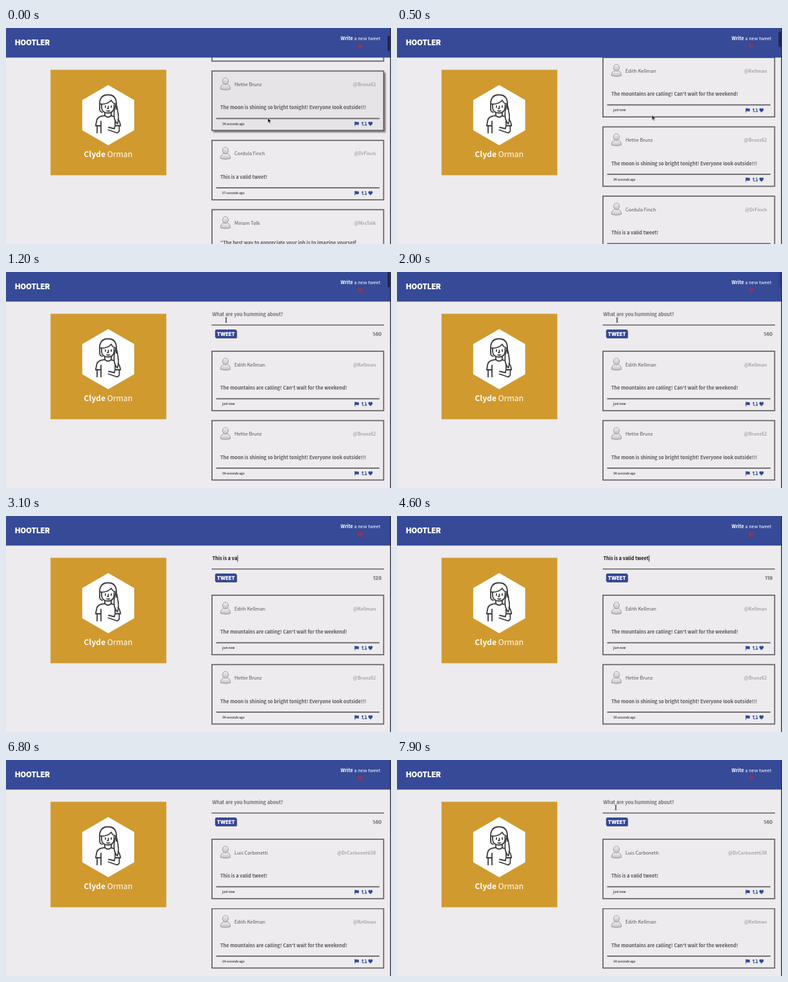
Recreate the animation shown at these times as an HTML page. Size 600 px wide and 338 px high, loop 8 s.

```html
<!DOCTYPE html>
<html lang="en">
<head>
<meta charset="utf-8">
<title>Short message feed</title>
<style>
  html, body { margin: 0; width: 100%; height: 100%; overflow: hidden; background: #edebed; }
  svg { display: block; width: 600px; height: 338px; font: 700 7.35px "Noto Sans CJK JP", "Noto Sans CJK SC", "Noto Sans CJK", "Open Sans", sans-serif; }
  .block { font-family: Inter, "Open Sans", sans-serif; font-weight: 900; }
  .line { fill: none; stroke: #625e65; stroke-width: 1.7; }
  .name { font-weight: 300; fill: #59555a; }
  .handle { font-size: 7px; fill: #aaa7aa; text-anchor: end; }
  .body { fill: #5b575c; }
  .time { font-size: 4.7px; fill: #454147; }
  .icons { fill: #3047a0; }

  .scroll { animation: scroll 8s infinite; }
  .mouse { animation: move 8s linear infinite, hide 8s step-end infinite; }
  .arrow { animation: arrow 8s step-end infinite; }
  .beam { animation: beam 8s step-end infinite; }
  .thumb { animation: thumb 8s linear infinite; }
  .chevron { transform-origin: 552px 28px; animation: tada 2s linear infinite; }
  .shade { opacity: 0; }
  .shade.first { animation: over-first 8s step-end infinite; }
  .shade.second { animation: over-second 8s step-end infinite; }

  @keyframes scroll {
    0% { transform: translateY(-165.2px); animation-timing-function: cubic-bezier(.333, 0, .667, 1); }
    12.06%, 100% { transform: none; }
  }
  @keyframes move {
    0% { transform: translate(408px, 141px); }
    10% { transform: translate(391px, 134px); }
    15%, 80% { transform: translate(343px, 75px); }
    92%, 100% { transform: translate(341px, 74px); }
  }
  @keyframes hide { 0% { opacity: 1; } 25.6% { opacity: 0; } 88.1%, 100% { opacity: 1; } }
  @keyframes arrow { 0% { opacity: 1; } 14.3%, 100% { opacity: 0; } }
  @keyframes beam { 0% { opacity: 0; } 14.3%, 100% { opacity: 1; } }
  @keyframes thumb {
    0% { transform: translateY(12px); opacity: 1; animation-timing-function: cubic-bezier(.333, 0, .667, 1); }
    12.06%, 22% { transform: none; opacity: 1; }
    26%, 100% { transform: none; opacity: 0; }
  }
  @keyframes over-second { 0% { opacity: 1; } 5.6%, 100% { opacity: 0; } }
  @keyframes over-first { 0% { opacity: 0; } 6.4% { opacity: 1; } 11.3%, 100% { opacity: 0; } }
  @keyframes tada {
    0%, 100% { transform: none; }
    10%, 20% { transform: scale(.9) rotate(-8deg); }
    30%, 50%, 70% { transform: scale(1.15) rotate(8deg); }
    40%, 60% { transform: scale(1.15) rotate(-8deg); }
    80% { transform: none; }
  }
</style>
</head>
<body>
<svg viewBox="0 0 600 338" aria-label="Message feed">
  <defs>
    <linearGradient id="skin" x2="0" y2="1">
      <stop stop-color="#f4f3f3"/><stop offset="1" stop-color="#bfbdbe"/>
    </linearGradient>
    <filter id="soft" x="-5%" y="-10%" width="115%" height="125%"><feGaussianBlur stdDeviation="1.3"/></filter>
    <g id="avatar" fill="url(#skin)" stroke="#959295" stroke-width=".9">
      <path d="M334.500 28.500q-.6-6 5-8h5q5.600 2 5 8q-7.500 2.400-15 0z"/>
      <ellipse cx="342" cy="16" rx="4.500" ry="5.200"/>
    </g>
    <g id="icons" class="icons">
      <path d="M543.300 79.300h1v.5q1.600-.8 3 0q1.300.6 2.600-.1v4.300q-1.500.8-3 .1q-1.300-.5-2.600.2v1.900h-1z"/>
      <path d="M555.600 80.500v4.300h3M559 80.200h1.900v4.300" fill="none" stroke="#3047a0"/>
      <path d="M553.700 81.600l1.900-2.300 1.900 2.300zM559 83.600l1.900 2.300 1.900-2.300z"/>
      <path d="M568 86l-2.900-3.100q-1.200-1.800.1-3.100q1.500-1.100 2.800.4q1.300-1.500 2.800-.4q1.300 1.300.1 3.100z"/>
    </g>
  </defs>

  <rect width="600" height="338" fill="#edebed"/>

  <g class="profile">
    <rect x="69.400" y="65.400" width="180.400" height="165" fill="#d19a2e"/>
    <path d="M159.300 89.300l40.500 23.500v47.200l-40.500 23.500-40.500-23.500v-47.200z" fill="#fff"/>
    <g fill="none" stroke="#3b3a3d" stroke-width="1.8" stroke-linecap="round" stroke-linejoin="round">
      <path d="M146 127v-10q1-12.500 13-12.500t13 12.500v10"/>
      <path d="M146 127q0 4 4 5M146.500 119q12 1 17.500-6q2 5 7.500 6"/>
      <path d="M149 120v5q1 8 10 8q8 0 9.500-8v-5"/>
      <path d="M171.500 119q-4 11-3 20q1 7 5 11q3-8 1-17q-.6-8-3-14"/>
      <path d="M155 122v2M164 122v2M159.500 122.500v3.500h-1.500M157 129.500q2.500 1 4.500 0"/>
      <path d="M154 133v4q5 5 10 0v-4M154 137q-11 1-12.500 7l-1.700 9h8M148 146v18M142 153v11"/>
      <path d="M164 137.500l4 .8M174.500 143q2 2 2.500 4l1.500 6h-8M176.500 153v8q-1 3-4 3l-13-4.500M170 146v7q-1 3-1 4.500l-9-2"/>
    </g>
    <text x="159.200" y="202" text-anchor="middle" font-size="12.2" font-weight="300" fill="#fff"><tspan font-weight="700">Clyde</tspan> Orman</text>
  </g>

  <g class="scroll">
    <text id="field" x="321.500" y="69.200"></text>
    <rect id="caret" y="61.500" width=".9" height="10" fill="#222"/>
    <path class="line" d="M320.500 83h268.500"/>
    <rect x="327" y="91.500" width="33.200" height="12.500" rx="1.500" fill="#77758a"/>
    <rect x="326.300" y="90.500" width="32.700" height="12.300" rx="1.500" fill="#34499b" stroke="#27336b" stroke-width=".8"/>
    <text class="block" x="342.800" y="99.600" font-size="7.600" fill="#fff" text-anchor="middle">TWEET</text>
    <text id="count" class="block" x="585.500" y="99.700" font-size="7.700" fill="#888589" text-anchor="end"></text>
    <g id="list"></g>
  </g>

  <g class="header">
    <rect width="600" height="46.300" fill="#364a97"/>
    <text class="block" x="14" y="26.500" font-size="11.300" fill="#fff">HOOTLER</text>
    <text x="583.500" y="19.200" text-anchor="end" font-size="7.300" font-weight="400" fill="#fff"><tspan font-weight="700">Write</tspan> a new tweet</text>
    <path class="chevron" d="M548.800 25.500l3.200 2.500 3.200-2.500M548.800 28.900l3.200 2.500 3.200-2.500" fill="none" stroke="#a92f44" stroke-width="1.700"/>
  </g>
  <rect x="598.600" width="1.400" height="338" fill="#30323f"/>
  <rect class="thumb" x="594.800" width="3.600" height="24" rx="1.800" fill="#1c2448"/>

  <g class="mouse">
    <path class="arrow" d="M0-.5v8l1.800-1.700 1.300 2.900 1.300-.6-1.300-2.800h2.500z" fill="#111" stroke="#fff" stroke-width=".6"/>
    <path class="beam" d="M-1.500-3.500q1.500 0 1.500 1v5.500q0 1-1.500 1M1.500-3.500q-1.500 0-1.500 1v5.500q0 1 1.500 1" fill="none" stroke="#333" stroke-width=".9"/>
  </g>
</svg>
<script>
  const LOOP = 8000, STEP = 108.5, LIMIT = 140;
  const MESSAGE = "This is a valid tweet!";
  const PROMPT = "What are you humming about?";
  const CLEARED = 5550, POSTED = 6250;
  // [time, letters typed]
  const TYPING = [[2050, 0], [3050, 12], [4550, 21], [4850, 22]];
  const $ = id => document.getElementById(id);

  const cards = [
    ["Luis Carbonetti", "@DrCarbonetti38", [MESSAGE], "just now", ""],
    ["Edith Kellman", "@Kellman", ["The mountains are calling! Can't wait for the weekend!"], "just now", "first"],
    ["Hettie Brunz", "@Brunz62", ["The moon is shining so bright tonight! Everyone look outside!!!"], "34 seconds ago", "second"],
    ["Cordula Finch", "@DrFinch", [MESSAGE], "57 seconds ago", ""],
    ["Miriam Tolk", "@MrsTolk", ["“The best way to appreciate your job is to imagine yourself", "without one.”"], "1 minute ago", ""]
  ];

  const bodyLine = (line, i, lines) =>
    `<text class="body" x="334" y="${60 + (i - (lines.length - 1) / 2) * 10.5}">${line}</text>`;

  const card = ([name, handle, lines, time, hover], i) => `
    <g id="card${i}" transform="translate(0 ${124 + (i - 1) * STEP})">
      <g class="shade ${hover}">
        <rect x="323" y="2.500" width="268.500" height="93.500" fill="#777" filter="url(#soft)"/>
        <rect x="321" width="267.500" height="93" fill="#e6e4e6"/>
      </g>
      <rect class="line" x="321" width="267.500" height="93"/>
      <use href="#avatar"/>
      <text class="name" x="356" y="23.700">${name}</text>
      <text class="handle" x="576.500" y="23.500">${handle}</text>
      ${lines.map(bodyLine).join("")}
      <path class="line" d="M327.500 74.300h254.500"/>
      <text class="time" x="337" y="84.300">${time}</text>
      <use href="#icons"/>
    </g>`;
  $("list").innerHTML = cards.map(card).join("");
  const firstTime = $("card1").querySelector(".time");

  function typedAt(t) {
    if (t >= CLEARED) return 0;
    let n = 0;
    TYPING.forEach(([start, from], i) => {
      if (t < start) return;
      const [end, to] = TYPING[i + 1] || [start + 1, from];
      n = from + (to - from) * Math.min(1, (t - start) / (end - start));
    });
    return Math.floor(n);
  }

  function draw(now) {
    const t = now % LOOP, n = typedAt(t), posted = t >= POSTED;
    const field = $("field");
    field.textContent = n ? MESSAGE.slice(0, n) : PROMPT;
    field.setAttribute("fill", n ? "#161417" : "#716d72");
    $("count").textContent = LIMIT - n;

    const blink = t % 1000 >= 500;
    $("caret").setAttribute("x", n ? 321.8 + field.getComputedTextLength() : 321);
    $("caret").style.opacity = t < CLEARED && (n || blink) ? 1 : 0;

    $("list").setAttribute("transform", `translate(0 ${posted ? STEP : 0})`);
    $("card0").style.display = posted ? "" : "none";
    firstTime.textContent = posted ? "14 seconds ago" : "just now";
  }

  function tick() {
    draw(performance.now());
    requestAnimationFrame(tick);
  }
  tick();
</script>
</body>
</html>
```
